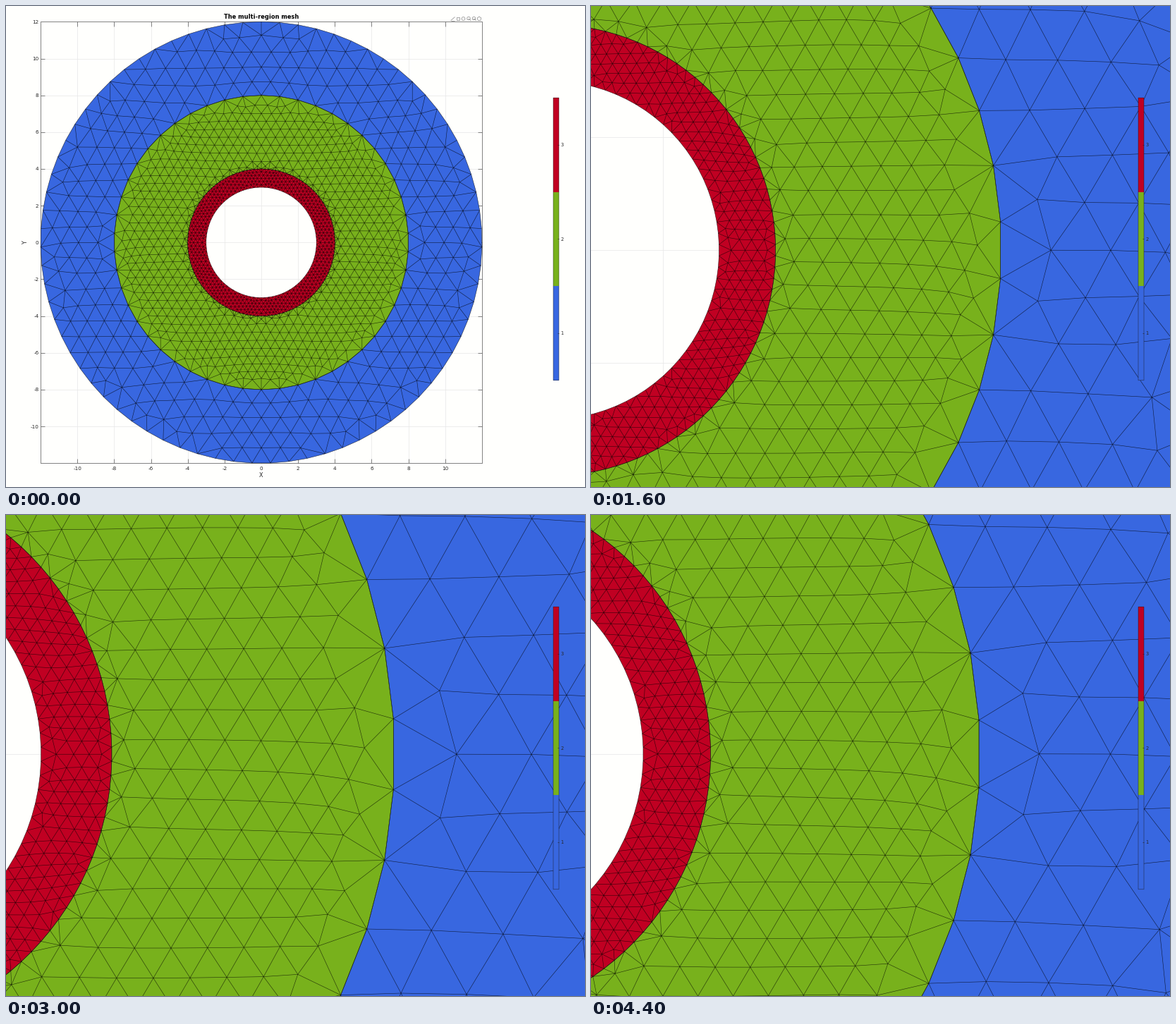
Animation of 821 by 682 pixels, one loop 4.6 s. Source, as a matplotlib script:

```python
import numpy as np
import matplotlib.pyplot as plt
from matplotlib.animation import FuncAnimation
from matplotlib.collections import LineCollection
from matplotlib.patches import PathPatch, Rectangle
from matplotlib.path import Path
from matplotlib.transforms import Affine2D
from matplotlib.tri import Triangulation

W, H, DPI = 821, 682, 64
PT = 72 / DPI                     # points per pixel
PAPER, FRAME, GRID, INK, TOOL = "#fffffd", "#666666", "#e9e9e9", "#262626", "#8a8a8a"
BLUE, GREEN, RED = "#3867e0", "#78b11c", "#c00022"
plt.rcParams["font.family"] = "DejaVu Sans"

# point spacing along each circle, by radius
RING_STEP = {12: 1, 8: 1, 4: 0.2, 3: 0.2}

# outer radius, inner radius, spacing, outer gap, inner gap, colour
REGIONS = [
    (12, 8, 1.0, 0.48, 0.38, BLUE),
    (8, 4, 0.5, 0.2, 0.1, GREEN),
    (4, 3, 0.2, 0.08, 0.08, RED),
]


def count(r):
    return round(2 * np.pi * r / RING_STEP[r])


def ring(r):
    a = np.pi / 2 + 2 * np.pi * np.arange(count(r)) / count(r)
    return np.column_stack([r * np.cos(a), r * np.sin(a)])


def ring_offset(p, r):
    """Signed distance to the sides of a ring polygon, positive outside."""
    step = 2 * np.pi / count(r)
    a = (np.arctan2(p[:, 1], p[:, 0]) - np.pi / 2) % step - step / 2
    return np.hypot(p[:, 0], p[:, 1]) * np.cos(a) - r * np.cos(step / 2)


def lattice(r, h):
    nx = round(2 * r / h)
    ny = round(2 * r / (h * np.sqrt(3) / 2)) + 1
    x, y = np.meshgrid(np.linspace(-r, r, nx), np.linspace(-r, r, ny))
    x[1::2] += r / (nx - 1)
    return np.column_stack([x.ravel(), y.ravel()])


def find_edges(p, outer, inner):
    tri = Triangulation(p[:, 0], p[:, 1])
    t, start = tri.triangles, count(outer)
    tri.set_mask(((t >= start) & (t < start + count(inner))).all(axis=1))
    return tri.edges


def mesh(outer, inner, h, gap_out, gap_in, rounds=80):
    p = lattice(outer, h)
    p = p[(ring_offset(p, outer) < -gap_out) & (ring_offset(p, inner) > gap_in)]
    p = np.vstack([ring(outer), ring(inner), p])
    fixed = count(outer) + count(inner)

    # weakly connected inner points are dropped
    e = find_edges(p, outer, inner)
    degree = np.bincount(e.ravel(), minlength=len(p))
    p = p[(degree > 4) | (np.arange(len(p)) < fixed)]

    e = find_edges(p, outer, inner)
    a, b = np.concatenate([e, e[:, ::-1]]).T
    degree = np.maximum(np.bincount(a, minlength=len(p)), 1)
    for _ in range(rounds):
        mean = np.column_stack(
            [np.bincount(a, p[b, k], len(p)) / degree for k in (0, 1)])
        p[fixed:] = mean[fixed:]
    return p[e]


def annulus(outer, inner):
    parts = [ring(outer), ring(inner)[::-1]]
    loops = [Path(np.vstack([q, q[:1]]), closed=True) for q in parts]
    return Path.make_compound_path(*loops)


# camera: zoom about a cursor, plus one short pan
FRAMES = 23
HOME, CURSOR = np.array([362, 335.3]), np.array([565.2, 330])
BASE, WORK, NEAR = 26.08, 80.05, 125.5
PAN = np.array([-28.1, -8.9]) / WORK
ZOOM = [(5, BASE), (6, 42.46), (8, WORK), (14, WORK),
        (16, NEAR), (19, NEAR), (20, 110.5), (22, 95.5)]
ZOOM_AT, ZOOM_TO = np.array(ZOOM).T


def camera(i):
    s = np.exp(np.interp(i, ZOOM_AT, np.log(ZOOM_TO)))
    pan = PAN * np.clip((i - 10) / 3, 0, 1)
    return s, CURSOR + ((HOME - CURSOR) / BASE + pan) * s


fig = plt.figure(figsize=(W / DPI, H / DPI), dpi=DPI, facecolor=PAPER)
ax = fig.add_axes([0, 0, 1, 1])
ax.set_xlim(0, W)
ax.set_ylim(H, 0)
ax.axis("off")

cam = Affine2D()
world = cam + ax.transData


def lines(segs, color, px, z, **kw):
    col = LineCollection(segs, colors=color, linewidths=px * PT, zorder=z, **kw)
    ax.add_collection(col, autolim=False)
    return col


# axes box, grid and ticks
marks = range(-10, 11, 2)
grid, ticks = [], []
for m in marks:
    grid += [[(m, -12), (m, 12)], [(-12, m), (12, m)]]
    for side in (-12, 12):
        end = side * 0.98
        ticks += [[(m, side), (m, end)], [(side, m), (end, m)]]
box = [[(-12, -12), (12, -12), (12, 12), (-12, 12), (-12, -12)]]
lines(grid, GRID, 0.8, 1, transform=world)
lines(ticks + box, FRAME, 0.8, 2, transform=world)

for *shape, color in REGIONS:
    ax.add_patch(PathPatch(annulus(*shape[:2]), fc=color, ec="none",
                           transform=world, zorder=3))
    lines(mesh(*shape), (0, 0, 0, 0.7), 0.6, 4, transform=world, snap=False)

# labels, in view only before zooming
labels = []


def label(x, y, s, px, **kw):
    kw = {"ha": "center", "va": "center", "color": INK, **kw}
    labels.append(ax.text(x, y, s, fontsize=px * PT, zorder=6, **kw))


for m in marks:
    label(HOME[0] + m * BASE, 656, str(m), 7.3)
for m in [*marks, 12]:
    label(46.5, HOME[1] - m * BASE, str(m), 7.3, ha="right", va="center_baseline")
label(362, 666, "X", 8)
label(27.5, 335.5, "Y", 8, rotation=90)
label(361.8, 15.5, "The multi-region mesh", 8.23, weight="bold", color="black")


# small toolbar: brush, tip, hand, two lenses, house
def polygon(x, y, r, n, turn=0):
    a = turn + 2 * np.pi * np.arange(n + 1) / n
    return np.column_stack([x + r * np.cos(a), y + r * np.sin(a)])


xs = 633.5 + 7.5 * np.arange(6)
glyphs = [[(xs[0] - 3, 20.8), (xs[0] + 3, 15.5)], [(xs[0] - 3, 20.8), (xs[0] + 2, 20.8)],
          polygon(xs[1], 18, 3.3, 4, np.pi / 4), polygon(xs[2], 18, 2.6, 6),
          polygon(xs[5], 18, 3, 5, -np.pi / 2)]
for x in xs[3:5]:
    glyphs += [polygon(x, 17.6, 2.3, 16), [(x + 1.6, 19.2), (x + 3.2, 20.9)],
               [(x - 1.2, 17.6), (x + 1.2, 17.6)]]
toolbar = lines(glyphs, TOOL, 0.7, 7)

# colour bar
LEFT, RIGHT, TOP, STEP = 776, 784, 130.2, 133.5
for k, color in enumerate((RED, GREEN, BLUE)):
    y = TOP + k * STEP
    ax.add_patch(Rectangle((LEFT, y), RIGHT - LEFT, STEP, fc=color,
                           ec="none", zorder=8))
    mid = y + STEP / 2
    lines([[(RIGHT - 2, mid), (RIGHT, mid)]], INK, 0.6, 9)
    ax.text(788.5, mid, str(3 - k), fontsize=6.6 * PT, ha="center",
            va="center_baseline", color=INK, zorder=9)
ax.add_patch(Rectangle((LEFT, TOP), RIGHT - LEFT, 3 * STEP, fc="none",
                       ec=(0.1, 0.1, 0.1, 0.6), lw=0.7 * PT, zorder=9,
                       snap=False))


def draw(i):
    s, (x, y) = camera(i)
    cam.clear().scale(s, -s).translate(x, y)
    for t in labels:
        t.set_visible(i <= ZOOM_AT[0])
    toolbar.set_visible(i <= ZOOM_AT[1])
    return []


anim = FuncAnimation(fig, draw, frames=FRAMES, interval=200,
                     repeat=True, repeat_delay=0, blit=False)
plt.show()
```
